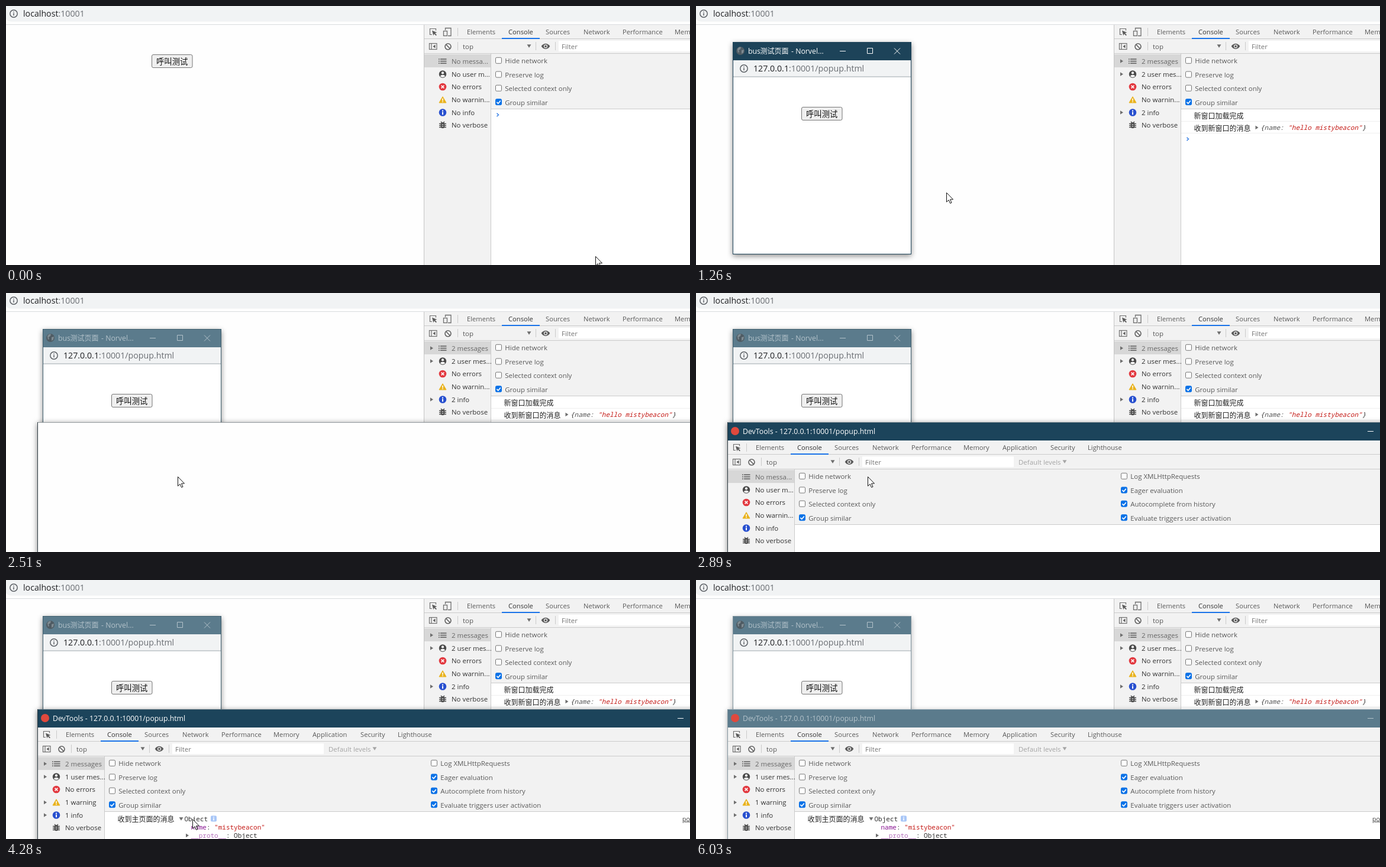
Recreate the animation shown at these times as an HTML page. Size 1156 by 439 pixels, loop 6.1 s.

```html
<!DOCTYPE html>
<html lang="zh-CN">
<head>
<meta charset="utf-8">
<title>Popup messaging demo</title>
<style>
  html, body { margin: 0; width: 100%; height: 100%; overflow: hidden; background: #fff; }
  svg { display: block; width: 1156px; height: 439px; }
  text { white-space: pre; }
  .ui { font-family: "Open Sans", "Noto Sans", sans-serif; }
  .cjk { font-family: "Noto Sans CJK SC", "Noto Sans CJK", sans-serif; }
  .mono { font-family: "Noto Sans Mono", "DejaVu Sans Mono", monospace; }
</style>
</head>
<body>
<svg id="stage" viewBox="0 0 1156 439"></svg>
<script>
const LOOP = 6100;
const stage = document.getElementById('stage');
const timed = [];
const GREY = '#f2f2f2', LINE = '#cbcbcb', INK = '#5a5a5a', DARK = '#333', BLUE = '#1a73e8';

// ---- drawing helpers ----
function el(parent, tag, attrs = {}, text) {
  const node = document.createElementNS('http://www.w3.org/2000/svg', tag);
  for (const key in attrs) node.setAttribute(key, attrs[key]);
  if (text !== undefined) node.textContent = text;
  parent.appendChild(node);
  return node;
}
const rect = (p, x, y, width, height, fill, more) => el(p, 'rect', { x, y, width, height, fill, ...more });
const path = (p, d, stroke, more) => el(p, 'path', { d, stroke, fill: 'none', ...more });
const shape = (p, d, fill) => el(p, 'path', { d, fill });
const disc = (p, cx, cy, r, fill, more) => el(p, 'circle', { cx, cy, r, fill, ...more });
const label = (p, x, y, s, fill = INK, size = 11.45, font = 'ui') =>
  el(p, 'text', { x, y, fill, 'font-size': size, class: font }, s);
const cjk = (p, x, y, s, fill = '#222', size = 12) => label(p, x, y, s, fill, size, 'cjk');

function runs(p, x, y, size, font, parts) {
  const t = label(p, x, y, '', INK, size, font);
  for (const [s, fill, more] of parts) el(t, 'tspan', { fill, ...more }, s);
}
// A group that is visible from one time to another.
function during(p, from, to = LOOP) {
  const node = el(p, 'g');
  timed.push({ node, from, to });
  return node;
}
const right = (p, x, y, fill = '#6e6e6e') => shape(p, `M${x - 2} ${y - 3.2}l5 3.2l-5 3.2z`, fill);
const down = (p, x, y, fill = '#6e6e6e') => shape(p, `M${x - 3.5} ${y - 2.5}h7l-3.5 5.5z`, fill);

function infoIcon(p, x, y) {
  disc(p, x, y, 6.2, 'none', { stroke: '#5f6368', 'stroke-width': 1.5 });
  rect(p, x - .75, y - 1, 1.5, 4.2, '#5f6368');
  rect(p, x - .75, y - 3.5, 1.5, 1.5, '#5f6368');
}
function address(p, x, y, host, rest) {
  runs(p, x, y, 14.2, 'ui', [[host, '#202124'], [rest, '#6a6e73']]);
}
function button(p, x, y, fill, border) {
  rect(p, x + .5, y + .5, 68.5, 22, fill, { rx: 2.5, stroke: border });
  cjk(p, x + 8, y + 16.5, '呼叫测试', '#111', 13.33);
}
function check(p, x, y, text, on) {
  rect(p, x - 4.5, y - 5.5, 10, 10, on ? '#0b72e7' : '#fff', { rx: 1.8, stroke: on ? '#0b72e7' : '#767676' });
  if (on) path(p, `M${x - 2.6} ${y - .4}l2.4 2.5l4-4.8`, '#fff', { 'stroke-width': 1.7 });
  label(p, x + 11.3, y + 4.5, text);
}

// ---- developer tools panel ----
const ROWS = [93.5, 115.5, 137, 159, 180.5, 202];
const EMPTY = ['No messa...', 'No user m...', 'No errors', 'No warnin...', 'No info', 'No verbose'];

function counts(p, texts) {
  texts.forEach((s, i) => {
    label(p, 753, ROWS[i] + 4.3, s, i ? DARK : '#666');
    if (!s.startsWith('No')) right(p, 719, ROWS[i]);
  });
}
function sideIcons(p) {
  const x = 738;
  for (const y of [90, 93.5, 97]) {
    rect(p, x - 7, y - .7, 1.8, 1.5, '#5a5a5a');
    rect(p, x - 4, y - .7, 10.5, 1.5, '#5a5a5a');
  }
  disc(p, x, 115.5, 6.2, '#4a4a4a');
  disc(p, x, 113.4, 2.1, '#fff');
  shape(p, `M${x - 4} 119c1-3 7-3 8 0c-2 2.2-6 2.2-8 0z`, '#fff');
  disc(p, x, 137, 6.3, '#e2383f');
  path(p, `M${x - 2.4} 134.6l4.8 4.8m0-4.8l-4.8 4.8`, '#fff', { 'stroke-width': 1.5 });
  warnIcon(p, x, 159, 1);
  disc(p, x, 180.5, 6.3, '#2850cf');
  rect(p, x - 1, 179.6, 2, 4.6, '#fff');
  rect(p, x - 1, 176.6, 2, 2, '#fff');
  rect(p, x - 3.3, 197.2, 6.6, 10, '#4a4a4a', { rx: 3.3 });
  path(p, `M${x - 6} 199.5h12M${x - 6} 202.5h12M${x - 6} 205.5h12M${x - 3} 196l2 2m4-2l-2 2`, '#4a4a4a', { 'stroke-width': 1.4 });
  path(p, `M${x - 1.4} 201h2.8m-2.8 3h2.8`, '#fff');
}
function warnIcon(p, x, y, k) {
  const g = el(p, 'g', { transform: `translate(${x} ${y}) scale(${k})` });
  el(g, 'path', { d: 'M0-5.3L6 5H-6z', fill: '#e9b21c', stroke: '#e9b21c', 'stroke-linejoin': 'round' });
  rect(g, -.8, -2.3, 1.6, 4, '#fff');
  rect(g, -.8, 2.6, 1.6, 1.5, '#fff');
}
function toolbars(p, shift) {
  rect(p, 707, 32, 1200, 49, GREY);
  rect(p, 707, 55, 1200, 1, LINE);
  rect(p, 707, 80, 1200, 1, LINE);
  path(p, 'M720 48.5h-3.5v-10h10v3', '#6e6e6e', { 'stroke-width': 1.2 });
  shape(p, 'M720 41.5l8.5 3.5l-3.5 1.1l3 3l-1.3 1.2l-3-3l-1.3 3z', '#5a5a5a');
  if (!shift) {
    path(p, 'M742.5 41v-3.5h9.5v13h-5', '#6e6e6e', { 'stroke-width': 1.3 });
    rect(p, 739.5, 42.5, 6, 8, GREY, { stroke: '#6e6e6e', 'stroke-width': 1.3 });
  }
  const g = el(p, 'g', { transform: `translate(${-shift} 0)` });
  rect(g, 763, 37, 1, 14, LINE);
  const tabs = { Elements: 779, Console: 849, Sources: 912, Network: 976, Performance: 1042,
    Memory: 1130, Application: 1196, Security: 1277, Lighthouse: 1340 };
  for (const name in tabs) label(g, tabs[name], 48, name, name === 'Console' ? DARK : INK, 11.2);
  rect(g, 838, 54, 64, 2, BLUE);

  rect(p, 715.5, 63.5, 12.5, 10, 'none', { stroke: '#6e6e6e', 'stroke-width': 1.2 });
  path(p, 'M719 63v11', '#6e6e6e', { 'stroke-width': 1.2 });
  shape(p, 'M725.5 65.5v6l-4-3z', '#5a5a5a');
  disc(p, 747, 68.8, 5, 'none', { stroke: '#5f5f5f', 'stroke-width': 1.6 });
  path(p, 'M743.5 65.3l7 7', '#5f5f5f', { 'stroke-width': 1.6 });
  for (const x of [763, 895, 928]) rect(p, x, 61, 1, 14, LINE);
  label(p, 772, 72.8, 'top');
  down(p, 884, 67.8);
  shape(p, 'M904.7 68.3c3.4-6.2 11.2-6.2 14.6 0c-3.4 6.2-11.2 6.2-14.6 0z', '#5a5a5a');
  disc(p, 912, 68.3, 2.5, '#5a5a5a', { stroke: GREY, 'stroke-width': 1.2 });
  rect(p, 934, 59, shift ? 256 : 300, 18, '#fff');
  label(p, 939, 72.8, 'Filter', '#757575');
  if (shift) {
    label(p, 1198, 72.8, 'Default levels', '#a5a5a5');
    down(p, 1276, 67.8, '#a5a5a5');
  }
}
function panel(p, shift, countsAt, texts) {
  rect(p, 707, 81, 1200, 400, '#fff');
  toolbars(p, shift);
  rect(p, 707, 81, 112, 400, GREY);
  rect(p, 707, 82, 112, 22, '#d7d7d7');
  rect(p, 819, 81, 1, 400, LINE);
  rect(p, 820, 81, 1100, 93, GREY);
  rect(p, 820, 174, 1100, 1, LINE);
  sideIcons(p);
  counts(during(p, 0, countsAt), EMPTY);
  counts(during(p, countsAt), texts);
  const left = ['Hide network', 'Preserve log', 'Selected context only', 'Group similar'];
  const other = ['Log XMLHttpRequests', 'Eager evaluation', 'Autocomplete from history', 'Evaluate triggers user activation'];
  [92.8, 116.5, 139.7, 163.2].forEach((y, i) => {
    check(p, 832, y, left[i], i === 3);
    if (shift) check(p, 1376, y, other[i], i > 0);
  });
}
const prompt = (p, y) => path(p, `M829.5 ${y - 2.8}l3 2.8l-3 2.8`, '#2f7be5', { 'stroke-width': 1.4 });

// ---- main page ----
rect(stage, 0, 0, 1156, 439, '#fefefe');
rect(stage, -2, -10, 1200, 36.5, '#f1f3f4', { rx: 11 });
rect(stage, 0, 31, 1156, 1, '#d9dbde');
infoIcon(stage, 13, 13);
address(stage, 29, 18, 'localhost', ':10001');
button(during(stage, 0, 430), 246, 82, '#efefef', '#767676');
button(during(stage, 430, 630), 246, 82, '#e5e5e5', '#4f4f4f');
button(during(stage, 630), 246, 82, '#f5f5f5', '#8d8d8d');

rect(stage, 706, 32, 1, 407, '#c4c4c4');
panel(stage, 0, 1150, ['2 messages', '2 user mes...', 'No errors', 'No warnin...', '2 info', 'No verbose']);
prompt(during(stage, 0, 1080), 184.5);
prompt(during(stage, 1080, 1150), 205);
prompt(during(stage, 1150), 225.5);
const first = during(stage, 1080);
cjk(first, 841.5, 191, '新窗口加载完成');
rect(first, 820, 195, 336, 1, '#efefef');
const second = during(stage, 1150);
cjk(second, 841.5, 211.5, '收到新窗口的消息');
right(second, 947.5, 206);
const slant = { 'font-style': 'italic' };
runs(second, 954, 210, 11, 'mono', [['{', DARK, slant], ['name: ', '#565656', slant],
  ['"hello mistybeacon"', '#c41a16', slant], ['}', DARK, slant]]);
rect(second, 820, 215, 336, 1, '#efefef');

// ---- popup window ----
const popup = during(stage, 840);
function popupFrame(from, to, title, ink, edge, shadow) {
  const g = during(popup, from, to);
  rect(g, 62, 61, 302, 360, edge, { style: `filter:drop-shadow(0 3px 5px rgba(0,0,0,${shadow}))` });
  rect(g, 63, 92, 300, 328, '#fff');
  rect(g, 63, 62, 300, 30, title);
  disc(g, 75, 76, 7, '#4f5b63');
  shape(g, 'M70 73c2-4 5-4 6-3l-1 3l-3 2l1 3l-2 1zM77 75l4-1l-1 5l-3 2z', '#7f8b92');
  label(g, 88, 81, 'bus', ink, 12.3);
  cjk(g, 108.5, 81, '测试页面', ink);
  label(g, 161, 81, '- Norvel...', ink, 12.3);
  path(g, 'M243 76.5h10M289.5 71.5h9v9h-9zM335 71.5l10 10m0-10l-10 10', ink);
}
popupFrame(840, 2510, '#1d4359', '#fff', '#1d4359', .45);
popupFrame(2510, 6030, '#5b7b8c', '#b3c2ca', '#3d5d6d', .45);
popupFrame(6030, LOOP, '#5b7b8c', '#b3c2ca', '#7c919c', .3);
const bar = during(popup, 900);
rect(bar, 63, 92, 300, 28, '#f1f3f4');
rect(bar, 63, 119.5, 300, 1, '#9da7ad');
infoIcon(bar, 81, 106);
address(bar, 97, 111, '127.0.0.1', ':10001/popup.html');
button(during(popup, 960), 178, 171, '#efefef', '#767676');

// ---- detached tools window ----
const tools = during(stage, 2510);
rect(during(tools, 2510, 6030), 53, 219, 1200, 300, '#2c3a42', { style: 'filter:drop-shadow(0 2px 5px rgba(0,0,0,.5))' });
rect(during(tools, 6030), 53, 219, 1200, 300, '#8497a1', { style: 'filter:drop-shadow(0 2px 4px rgba(0,0,0,.3))' });
rect(tools, 54, 219.5, 1200, 300, '#fefefe');
function toolsTitle(from, to, fill, ink) {
  const g = during(tools, from, to);
  rect(g, 54, 219.5, 1200, 30.5, fill);
  disc(g, 66, 234, 7, '#e0493d');
  label(g, 79, 239, 'DevTools - 127.0.0.1:10001/popup.html', ink, 12.3);
  path(g, 'M1135 234.5h10', ink);
}
toolsTitle(2580, 6030, '#1c445b', '#fff');
toolsTitle(6030, LOOP, '#5b7b8c', '#b3c2ca');
const inner = el(during(tools, 2790), 'g', { transform: 'translate(-653 218)' });
panel(inner, 25, 3140, ['2 messages', '1 user mes...', 'No errors', '1 warning', '1 info', 'No verbose']);

const log = during(tools, 3070);
cjk(log, 188.5, 410, '收到主页面的消息');
label(log, 301.5, 408.5, 'Object', DARK, 11, 'mono');
runs(log, 1143, 408.5, 11, 'mono', [['popup.html:26', '#545454', { 'text-decoration': 'underline' }]]);

const closed = during(log, 3070, 4210);
right(closed, 295.5, 404.5);
rect(closed, 167, 415, 1000, 30, '#fffbe5');
rect(closed, 167, 415, 1000, 1, '#fff0b8');
warnIcon(closed, 179, 424, .8);
runs(closed, 189, 429, 11, 'mono', [
  ['DevTools failed to load SourceMap: Could not load content for ', '#5c3c00'],
  ['chrome-extension://jijileelaefjahodboljljdgfpbjjlac/content/content.main.js.map', '#545454', { 'text-decoration': 'underline' }],
  [': HTTP error:', '#5c3c00']]);
label(closed, 189, 443, 'status code 404, net::ERR_UNKNOWN_URL_SCHEME', '#5c3c00', 11, 'mono');

const open = during(log, 4210);
down(open, 296, 404.8);
rect(open, 346, 399.5, 10, 10, '#a9c7f7', { rx: 2 });
rect(open, 350.2, 403.6, 1.6, 4, '#fff');
rect(open, 350.2, 401.2, 1.6, 1.5, '#fff');
runs(open, 312.5, 423, 11, 'mono', [['name', '#881391'], [': ', DARK], ['"mistybeacon"', '#c41a16']]);
right(open, 306, 433);
runs(open, 312.5, 437, 11, 'mono', [['__proto__', '#b571bd'], [': Object', DARK]]);

// ---- pointer ----
function ring(from, to, x, y) {
  disc(during(stage, from, to), x, y, 12, 'rgba(255,255,0,.47)');
}
ring(630, 700, 291, 98);
ring(1830, 1900, 290, 311);
ring(4210, 4280, 315, 405);
const pointer = during(stage, 0, 4860);
el(pointer, 'path', { d: 'M.5.5V16.2L4.1 12.8L6.6 18.5L9 17.4L6.5 11.9H11.5Z', fill: '#fff', stroke: '#111', 'stroke-linejoin': 'round' });

// start, end, steps, then the points passed
const moves = [
  [0, 0, 1, [996, 424]],
  [60, 430, 7, [980, 416], [291, 98]],
  [770, 1210, 8, [294, 104], [427, 317]],
  [1260, 1580, 5, [423, 316], [350, 307], [290, 311]],
  [3390, 3980, 10, [292, 318], [350, 420], [319, 412]],
  [4030, 4030, 1, [315, 405]],
  [4350, 4790, 8, [325, 406], [684, 424]]
];
function pointerAt(t) {
  const [from, to, steps, ...pts] = moves.filter(m => m[0] <= t).pop();
  if (pts.length < 2) return pts[0];
  const k = Math.min(steps - 1, Math.floor((t - from) / (to - from) * (steps - 1) + 1e-6)) / (steps - 1);
  const u = k * k * (3 - 2 * k) * (pts.length - 1);
  const i = Math.min(pts.length - 2, Math.floor(u));
  return pts[i].map((v, n) => Math.round(v + (pts[i + 1][n] - v) * (u - i)));
}

function draw(t) {
  for (const { node, from, to } of timed) node.style.display = t >= from && t < to ? '' : 'none';
  pointer.setAttribute('transform', `translate(${pointerAt(t).join(' ')})`);
}
const start = performance.now();
function tick() {
  draw((performance.now() - start) % LOOP);
  requestAnimationFrame(tick);
}
draw(0);
requestAnimationFrame(tick);
</script>
</body>
</html>
```
